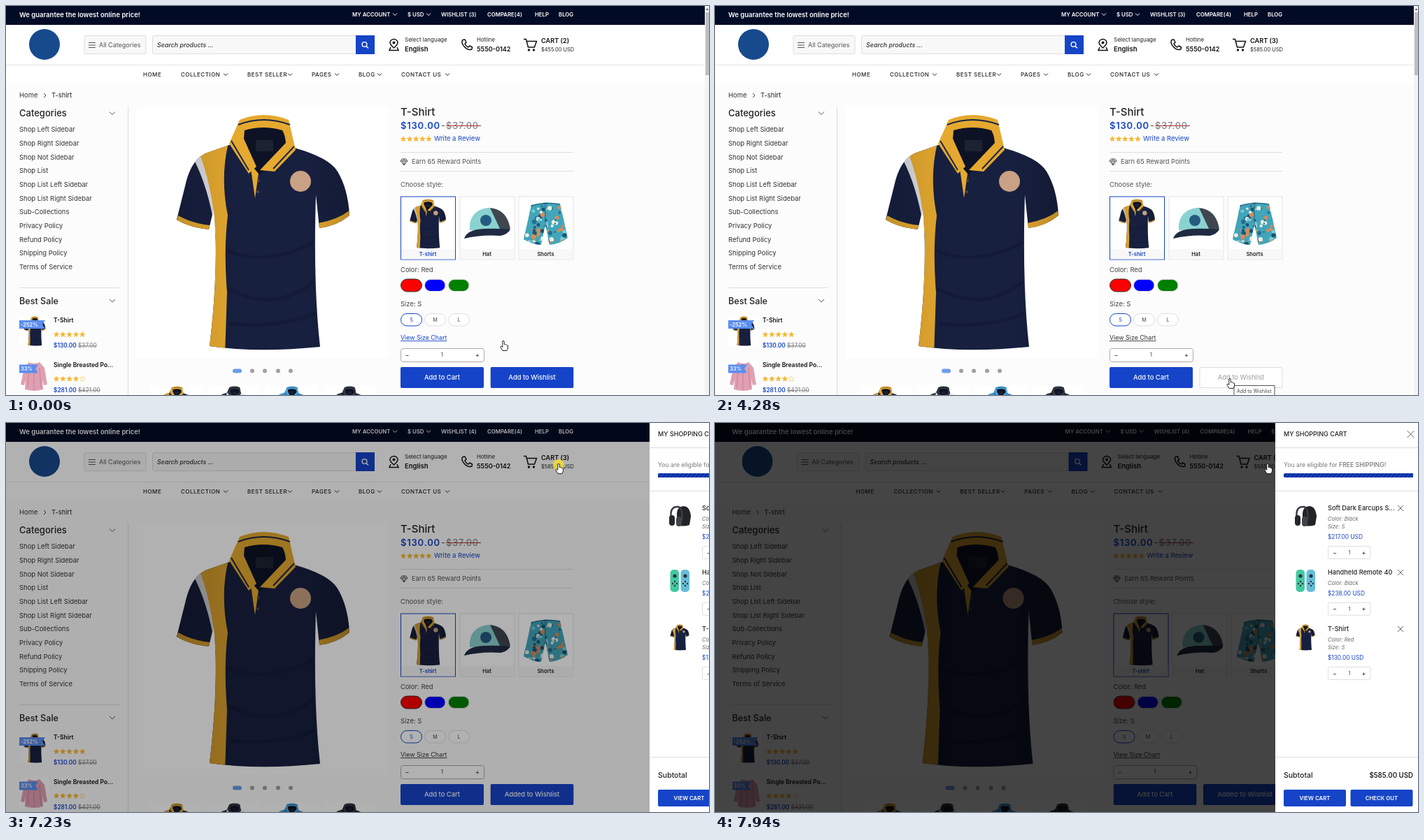
An HTML page that plays this animation: 1005 px wide and 557 px high, repeating every 8 s.

```html
<!DOCTYPE html>
<html lang="en">
<head>
<meta charset="utf-8">
<title>Shop</title>
<style>
html, body { margin: 0; width: 100%; height: 100%; overflow: hidden; background: #fcfcfc; }
svg { display: block; }
#stage { position: absolute; left: 0; top: 0; }
text { font-family: Inter, Roboto, sans-serif; white-space: pre; }
.step { animation: 8s step-end infinite; }
.page { animation-name: shift; }
.bar { animation-name: bar; }
.link { animation-name: link; }
.cartOld { animation-name: cartOld; }
.cartNew { animation-name: cartNew; }
.wishOld { animation-name: wishOld; }
.wishNew { animation-name: wishNew; }
.tip { animation-name: tip; }
.tipDone { animation-name: tipDone; }
.caret { animation-name: caret; }
.click { animation-name: click; }
.fillCart { animation: fillCart 8s linear infinite; }
.fillWish { animation: fillWish 8s linear infinite; }
.cursor { animation: cursor 8s ease-in-out infinite; }
.shade { animation: shade 8s ease infinite; }
.drawer { animation: drawer 8s ease infinite; }
.stripes { animation: stripes 1s linear infinite; }
@keyframes shift { 0% { transform: none } 90.4%, 100% { transform: translateX(5.5px) } }
@keyframes bar { 0% { opacity: 1 } 90.4%, 100% { opacity: 0 } }
@keyframes link { 0% { fill: #1544c8 } 1.9%, 100% { fill: #333 } }
@keyframes cartOld { 0% { opacity: 1 } 25.1%, 100% { opacity: 0 } }
@keyframes cartNew { 0% { opacity: 0 } 25.1%, 100% { opacity: 1 } }
@keyframes wishOld { 0% { opacity: 1 } 68.2%, 100% { opacity: 0 } }
@keyframes wishNew { 0% { opacity: 0 } 68.2%, 100% { opacity: 1 } }
@keyframes tip { 0% { opacity: 0 } 53.4% { opacity: 1 } 55.5%, 100% { opacity: 0 } }
@keyframes tipDone { 0% { opacity: 0 } 75% { opacity: 1 } 77.8%, 100% { opacity: 0 } }
@keyframes caret { 0% { opacity: 0 } 69% { opacity: 1 } 75%, 100% { opacity: 0 } }
@keyframes click {
  0% { opacity: 0 } 9.7% { opacity: 1 } 11.7% { opacity: 0 }
  57.4% { opacity: 1 } 59.4% { opacity: 0 }
  88.5% { opacity: 1 } 90.4%, 100% { opacity: 0 }
}
@keyframes fillCart {
  0%, 3.3% { clip-path: inset(0 0 0 0) }
  3.31%, 9.75% { clip-path: inset(0 100% 0 0) }
  23.5%, 30.1% { clip-path: inset(0 0 0 0) }
  30.11%, 43.4% { clip-path: inset(0 100% 0 0) }
  43.41%, 100% { clip-path: inset(0 0 0 0) }
}
@keyframes fillWish {
  0%, 44.9% { clip-path: inset(0 0 0 0) }
  44.91%, 57.5% { clip-path: inset(0 100% 0 0) }
  68.2%, 100% { clip-path: inset(0 0 0 0) }
}
@keyframes cursor {
  0%, .8% { transform: translate(711px, 479px) }
  4.75%, 42.6% { transform: translate(640px, 532px) }
  46.6%, 77.8% { transform: translate(736px, 533px) }
  87.5%, 100% { transform: translate(790px, 58px) }
}
@keyframes shade { 0%, 89.5% { opacity: 0 } 93%, 100% { opacity: .73 } }
@keyframes drawer { 0%, 89.5% { transform: translateX(204px) } 93%, 100% { transform: none } }
@keyframes stripes { to { stroke-dashoffset: -6 } }
</style>
</head>
<body>
<svg id="stage" width="1005" height="557" viewBox="0 0 1005 557">
<defs>
  <linearGradient id="fold">
    <stop offset="0" stop-color="#000" stop-opacity=".15"/><stop offset=".4" stop-color="#000" stop-opacity="0"/>
    <stop offset=".7" stop-color="#000" stop-opacity="0"/><stop offset="1" stop-color="#000" stop-opacity=".2"/>
  </linearGradient>
  <clipPath id="body"><path id="torso" d="M322 198L285 211Q264 221 256 258L244 306Q262 317 290 320L297 290Q305 370 291 487Q360 497 449 488Q439 400 443 270L448 318Q473 315 491 300Q489 262 474 237Q462 217 412 203Q365 215 322 198Z"/></clipPath>
  <clipPath id="trunks"><path d="M751 285Q771 279 792 283L803 332Q791 341 777 342L771 313L765 342Q751 341 740 334Z"/></clipPath>
  <g id="polo">
    <use href="#torso" style="fill:var(--main, #182040)"/>
    <g clip-path="url(#body)">
      <path d="M267 217L285 208Q306 270 306 340L292 400L300 330Q291 262 267 217Z" fill="#dcdde2"/>
      <path d="M277 212L318 196Q306 245 317 300Q311 350 316 410L313 500H286L296 400Q309 300 277 212Z" style="fill:var(--trim, #e5a92f)"/>
      <path d="M246 300Q268 312 292 314V324H240ZM446 311Q475 306 492 292V310L446 322Z" style="fill:var(--trim, #e5a92f)"/>
      <path d="M240 200H500V500H240Z" fill="url(#fold)"/>
      <path d="M318 405Q385 440 440 395M316 350Q370 375 441 338M320 455Q390 462 443 440" fill="none" stroke="#0c1229" stroke-width="5" opacity=".35"/>
    </g>
    <path d="M334 166Q368 152 404 166L411 203L362 242L320 196Z" fill="#0d1225"/>
    <path d="M357 192H382V208H357Z" fill="#1d2232"/>
    <path d="M349 226L361 240L356 275Z" style="fill:var(--trim, #e5a92f)"/>
    <path d="M334 163Q368 149 404 163L414 206L384 237L363 235L400 196Q399 184 395 178Q368 170 341 178L340 190L358 230L347 240L319 197Z" style="fill:var(--trim, #e5a92f)"/>
    <path d="M332 170Q368 156 406 170M322 193L347 235M412 201L382 233" fill="none" stroke="#1b2443" stroke-width="2"/>
    <circle cx="361" cy="250" r="2" fill="#543"/><circle cx="360" cy="266" r="2" fill="#543"/>
    <circle cx="421" cy="251" r="15" fill="#c9a184"/>
  </g>
</defs>
</svg>
<script>
const BLUE = '#1544c8', GOLD = '#f7b733', INK = '#222', LINE = '#dedede';

const text = (x, y, str, size = 9.45, fill = '#333', weight = 400, extra = '') =>
  `<text x="${x}" y="${y + size * .36}" font-size="${size}" fill="${fill}" font-weight="${weight}" ${extra}>${str}</text>`;
const mid = (x, y, str, size, fill, weight, extra = '') =>
  text(x, y, str, size, fill, weight, `text-anchor="middle" ${extra}`);
const box = (x, y, w, h, fill, stroke = 'none', r = 0, extra = '') =>
  `<rect x="${x}" y="${y}" width="${w}" height="${h}" rx="${r}" fill="${fill}" stroke="${stroke}" ${extra}/>`;
const line = (d, stroke = LINE, width = 1) =>
  `<path d="${d}" fill="none" stroke="${stroke}" stroke-width="${width}"/>`;
const dot = (x, y, r, fill, extra = '') => `<circle cx="${x}" cy="${y}" r="${r}" fill="${fill}" ${extra}/>`;
const chevron = (x, y, stroke = INK, w = 3) => line(`M${x - w} ${y - w / 2}l${w} ${w}l${w} ${-w}`, stroke);
const step = (name, content) => `<g class="step ${name}">${content}</g>`;
const polo = (x, y, s, style = '') =>
  `<use href="#polo" style="${style}" transform="translate(${x} ${y}) scale(${s}) translate(-367 -325)"/>`;

function stars(x, y, gap, filled = 5) {
  return [0, 1, 2, 3, 4].map(i => {
    let d = '';
    for (let k = 0; k < 10; k++) {
      const a = k * Math.PI / 5, r = k % 2 ? 1.8 : 4;
      d += `${k ? 'L' : 'M'}${x + i * gap + r * Math.sin(a)} ${y - r * Math.cos(a)}`;
    }
    return `<path d="${d}Z" fill="${i < filled ? GOLD : '#fff'}" stroke="${GOLD}" stroke-width=".5"/>`;
  }).join('');
}

function header() {
  const menu = [[196, 'HOME'], [250, 'COLLECTION', 314], [345, 'BEST SELLER', 406], [437, 'PAGES', 473],
    [504, 'BLOG', 534], [565, 'CONTACT US', 631]];
  const top = (x, str) => text(x, 12, str, 7.8, '#fff', 600);
  return box(-10, 0, 1025, 27, '#020b26') + box(-10, 27, 1025, 85, '#fff') + line('M-10 84.5H1015', '#e6e6e6')
    + text(19, 13, 'We guarantee the lowest online price!', 9.5, '#fff', 600)
    + top(495, 'MY ACCOUNT') + chevron(556, 12, '#fff') + top(574, '$ USD') + chevron(604, 12, '#fff')
    + step('wishOld', top(622, 'WISHLIST (3)')) + step('wishNew', top(622, 'WISHLIST (4)'))
    + top(688, 'COMPARE(4)') + top(756, 'HELP') + top(790, 'BLOG')
    + dot(55, 55, 22, '#174a8c')
    + box(112, 42.5, 88, 26, '#f8f8f8', LINE, 2) + line('M118 52.5h10m-10 3.5h10m-10 3.5h10', '#555')
    + text(133, 56, 'All Categories', 9, '#555')
    + box(209.5, 42.5, 317, 26, '#f8f8f8', LINE, 2) + text(216, 55.5, 'Search products ...', 8.9, '#333', 500, 'font-style="italic"')
    + box(500, 42, 27, 27, BLUE) + `<circle cx="512.5" cy="55" r="3.4" fill="none" stroke="#fff" stroke-width="1.4"/>` + line('M515 57.5l3 3', '#fff', 1.4)
    + line('M554.5 60Q549 55 549 52.5A5.5 5 0 0 1 560 52.5Q560 55 554.5 60ZM550 59l-2 4.5h13l-2-4.5', '#111', 1.5) + dot(554.5, 52.5, 2, '#111')
    + text(570, 48, 'Select language', 8, INK) + text(570, 62, 'English', 9.5, '#111', 600)
    + line('M653 48.5l3-.5l2 4l-2 2q2 4 5 5l2-2l3.5 2l-.5 3q-6 2-11-4t-2-9.5Z', '#111', 1.5)
    + text(673, 48, 'Hotline', 7.8, INK) + text(673, 62, '5550-0142', 9.1, '#111', 600)
    + line('M740 47.5h3.5l3 11.5h9l3-8.5h-14', '#111', 1.5) + dot(747.5, 63, 1.7, '#111') + dot(754.5, 63, 1.7, '#111')
    + step('cartOld', text(765, 50, 'CART (2)', 9.2, '#111', 600) + text(765, 62, '$455.00 USD', 7.4, INK))
    + step('cartNew', text(765, 50, 'CART (3)', 9.2, '#111', 600) + text(765, 62, '$585.00 USD', 7.4, INK))
    + menu.map(([x, str, c]) => text(x, 98, str, 8, INK, 500, 'letter-spacing=".5"') + (c ? chevron(c, 98) : '')).join('');
}

function sidebar() {
  const links = ['Shop Left Sidebar', 'Shop Right Sidebar', 'Shop Not Sidebar', 'Shop List', 'Shop List Left Sidebar',
    'Shop List Right Sidebar', 'Sub-Collections', 'Privacy Policy', 'Refund Policy', 'Shipping Policy', 'Terms of Service'];
  const product = (y, name, price, old, off, w, rate) =>
    `<path d="M19 ${y}h${w}l-4 6l4 6h${-w}Z" fill="#5b8def"/>` + text(21, y + 6, off, 7.5, '#fff', 600)
    + text(68, y, name, 8.5, '#111', 600) + stars(72, y + 20.5, 9.3, rate)
    + text(68, y + 36.5, price, 8.3, BLUE, 600) + text(103, y + 36.5, old, 8.3, '#777', 400, 'text-decoration="line-through"');
  return text(19, 128, 'Home') + line('M54 125l3 3l-3 3', '#444') + text(65, 128, 'T-shirt', 9.45, INK)
    + text(19, 153.5, 'Categories', 13, INK, 500) + chevron(152, 153.5, '#555', 4)
    + links.map((str, i) => text(19, 177 + i * 19.64, str)).join('')
    + line('M19 403.5H162M174.5 144V557') + text(19, 422, 'Best Sale', 12.6, INK, 500) + chevron(152, 422, '#555', 4)
    + box(19, 444, 43, 43, '#fff') + polo(41, 465.5, .125)
    + box(19, 508, 43, 43, '#fff') + '<path d="M33 510q8 4 15 0l7 8l4 24l-5 1l-2-8l1 14q-12 4-26 0l1-14l-2 8l-5-1l5-24Z" fill="#dfa0b2"/>' + line('M40 512v38M33 518l-2 29M48 518l2 29', '#c98098')
    + product(450, 'T-Shirt', '$130.00', '$37.00', '-252%', 37, 5) + product(513.5, 'Single Breasted Po...', '$281.00', '$421.00', '33%', 27, 4);
}

function gallery() {
  const looks = ['', '--main:#e5e7eb;--trim:#30343b', '--main:#2c83c4;--trim:#48a5dc', '--main:#15171c;--trim:#33363c'];
  return box(187, 144, 360, 360, '#fff') + polo(367, 325, 1) + box(324, 519.5, 13, 6, '#6d9ce8', 'none', 3)
    + [352, 370, 389, 407].map(x => dot(x, 522.5, 3, '#a0a0a0')).join('')
    + looks.map((look, i) => box(206 + i * 82.3, 543, 76, 20, '#fff') + polo(244 + i * 82.3, 580, .21, look)).join('');
}

function shorts() {
  let seed = 7;
  const rnd = () => (seed = seed * 16807 % 2147483647) / 2147483647;
  const tones = ['#1c5374', '#e5efe8', '#d98b55', '#79cbd5', '#276f92'];
  const spots = Array.from({ length: 90 }, (_, i) => dot(740 + rnd() * 63, 281 + rnd() * 61, 1 + rnd() * 2.4, tones[i % 5]));
  return `<g clip-path="url(#trunks)">${box(738, 278, 68, 68, '#42a5b9')}${spots.join('')}</g>` + line('M751 286Q771 280 792 284M771 313V285', '#245d75');
}

const hat = '<path d="M663 321C661 299 676 289 692 289L711 318L693 323Z" fill="#8ad2d0"/><path d="M692 289Q716 291 721 319Q714 324 708 323Z" fill="#3f4650"/><path d="M655 333Q659 320 683 319Q703 318 721 320Q717 327 707 329Q680 327 655 333Z" fill="#202b43"/>'
  + dot(686, 307, 8, '#255b82');

function button(x, name, hover, fill) {
  return box(x + .5, 517.5, 118, 29, '#fff', '#dcdcdc', 2) + hover
    + `<g class="${name}">${box(x, 517, 119, 30, BLUE, 'none', 2)}${fill}</g>`;
}

function details() {
  const card = (x, name, picked) => box(x + .5, 273, 78, 90, '#fff', picked ? BLUE : '#e3e3e3') + box(x + 1, 348, 77, 14.5, '#f8f8f8')
    + mid(x + 39, 355, name, 7.6, picked ? BLUE : INK, 600);
  const label = (x, str, fill, weight) => mid(x, 532, str, 9.4, fill, weight);
  return text(564, 152, 'T-Shirt', 15, INK, 500)
    + text(564, 171.5, '$130.00', 13, BLUE, 600, 'letter-spacing=".8"') + text(622, 171.5, '-', 13, '#555')
    + text(629, 171.5, '$37.00', 13, '#777', 400, 'letter-spacing=".8"') + line('M629 171.5h50', '#a33')
    + stars(568, 190.5, 9.1) + text(612, 190, 'Write a Review', 9.45, BLUE)
    + line('M564 209.5H811M564 236.5H811') + line('M566 219h6l2 3l-5 6l-5-6ZM564 222h10M569 228l-2-6l2-3l2 3Z', '#444', .9)
    + text(580, 223, 'Earn 65 Reward Points', 9.3, '#555') + text(564, 256, 'Choose style:', 9.45, '#555')
    + card(564, 'T-shirt', true) + card(648.5, 'Hat') + card(732.5, 'Shorts') + polo(603, 312, .21) + hat + shorts()
    + text(564, 378, 'Color: Red', 9.45, '#444')
    + box(564.5, 391, 30, 18, 'red', '#333', 9) + box(598.5, 391.5, 29.5, 17, 'blue', '#ddd', 8.5) + box(632.5, 391.5, 29.5, 17, 'green', '#ddd', 8.5)
    + text(564, 427, 'Size: S', 9.45, '#444')
    + ['S', 'M', 'L'].map((s, i) => box(564.5 + i * 34, 440.5, 30, 17.5, '#fff', i ? LINE : BLUE, 8.7) + mid(579.5 + i * 34, 449.5, s, 7.2, i ? '#444' : BLUE)).join('')
    + text(564, 475, 'View Size Chart', 8.9, '#333', 400, 'class="step link" text-decoration="underline"')
    + box(564.5, 490.5, 119, 19, '#fff', '#aaa', 3) + mid(573.5, 499.5, '−', 9, INK) + mid(623.5, 499.5, '1', 8, '#444') + mid(674, 499.5, '+', 9, INK)
    + button(564, 'fillCart', label(623.5, 'Add to Cart', '#999'), label(623.5, 'Add to Cart', '#fff', 500))
    + button(692.5, 'fillWish', label(752, 'Add to Wishlist', '#999'),
      step('wishOld', label(752, 'Add to Wishlist', '#fff', 500)) + step('wishNew', label(752, 'Added to Wishlist', '#fff', 500)));
}

const tooltip = (name, w, str) => step(name, box(742, 543.5, w, 15, '#fff', '#555') + text(746, 551, str, 7, '#444'));

function drawer() {
  const cross = (x, y, r) => line(`M${x - r} ${y - r}l${2 * r} ${2 * r}m0 ${-2 * r}l${-2 * r} ${2 * r}`, '#555', .9);
  const item = (y, name, notes, price) => {
    const py = y + 19 + notes.length * 11.2;
    return text(876, y, name, 9.2, INK, 500) + cross(980, y + .5, 4)
      + notes.map((n, i) => text(876, y + 15.5 + i * 11, n, 7.6, '#666', 400, 'font-style="italic"')).join('')
      + text(876, py, price + ' USD', 8.3, BLUE)
      + box(876.5, py + 13.5, 60.5, 18, '#fff', LINE, 2) + mid(886, py + 22.5, '−', 9, INK) + mid(907, py + 22.5, '1', 8, '#555') + mid(927.5, py + 22.5, '+', 9, INK);
  };
  const pad = (x, fill) => box(x, 210, 12.5, 32, fill, 'none', 5) + dot(x + 6.5, 219, 2.6, '#28343b')
    + [[0, -3], [0, 3], [-3, 0], [3, 0]].map(([dx, dy]) => dot(x + 6.5 + dx, 230 + dy, 1.2, '#28343b')).join('');
  return box(801, 0, 240, 557, '#fff')
    + text(813, 16, 'MY SHOPPING CART', 9, INK, 500) + cross(994.5, 16, 5) + line('M801 35.5h204M801 97.5h204M801 478.5h204')
    + text(813, 60, 'You are eligible for <tspan font-weight="500">FREE SHIPPING!</tspan>', 8.7, '#777')
    + `<svg x="813" y="72" width="185" height="6" overflow="hidden">${box(0, 0, 185, 6, BLUE, 'none', 2)}<path class="stripes" d="M-9 3H200" transform="skewX(-45)" stroke="#0b2c8c" stroke-width="6" stroke-dasharray="3 3"/></svg>`
    + '<path d="M840 146V129Q841 119 850 119Q859 120 860 134L858 146Q849 149 840 146Z" fill="#222327"/>' + line('M832 137Q829 119 842 120Q849 122 847 140', '#3a3c42', 2.5)
    + box(829, 132, 8, 15, '#25272c', 'none', 4) + box(839, 134, 8, 14, '#40434a', 'none', 4)
    + item(121.5, 'Soft Dark Earcups S...', ['Color: Black', 'Size: S'], '$217.00')
    + pad(830.5, '#43c9a0') + pad(845.5, '#66bdd8') + item(213.5, 'Handheld Remote 40', ['Color: Black'], '$238.00')
    + polo(844, 307, .11) + item(294.5, 'T-Shirt', ['Color: Red', 'Size: S'], '$130.00')
    + text(813, 504.5, 'Subtotal', 10.5, INK, 500) + text(998, 504.5, '$585.00 USD', 9.7, INK, 600, 'text-anchor="end"')
    + box(813, 525, 89, 24, BLUE, 'none', 2) + box(908.5, 525, 89, 24, BLUE, 'none', 2)
    + mid(857.5, 537, 'VIEW CART', 7.8, '#fff', 600) + mid(953, 537, 'CHECK OUT', 7.8, '#fff', 600);
}

const hand = '<path d="M-1.2 1Q0-.6 1.2 1V5.5Q2.5 4.8 3.2 6Q4.5 5.5 5 6.7Q6.5 6.5 6.5 8V11L5 14.5H-1L-4 9.5Q-4 7.5-2.5 8.2L-1.2 9.5Z" fill="#fff" stroke="#111" stroke-width=".9" stroke-linejoin="round"/>';

document.getElementById('stage').insertAdjacentHTML('beforeend',
  step('page', box(-10, 0, 1025, 557, '#fcfcfc') + header() + sidebar() + gallery() + details())
  + step('caret', line('M712.5 525v13', '#fff'))
  + step('bar', box(999, 0, 6, 557, '#f3f3f3') + box(1000, 9, 5, 90, '#bfbfbf') + '<path d="M1000.5 6l2-3l2 3Z" fill="#666"/>')
  + tooltip('tip', 58, 'Add to Wishlist') + tooltip('tipDone', 66, 'Added to Wishlist')
  + `<rect class="shade" width="1005" height="557"/><g class="drawer">${drawer()}</g>`
  + `<g class="cursor">${step('click', dot(0, 2, 8, '#f5e02c', 'opacity=".8"'))}${hand}</g>`);
</script>
</body>
</html>
```
